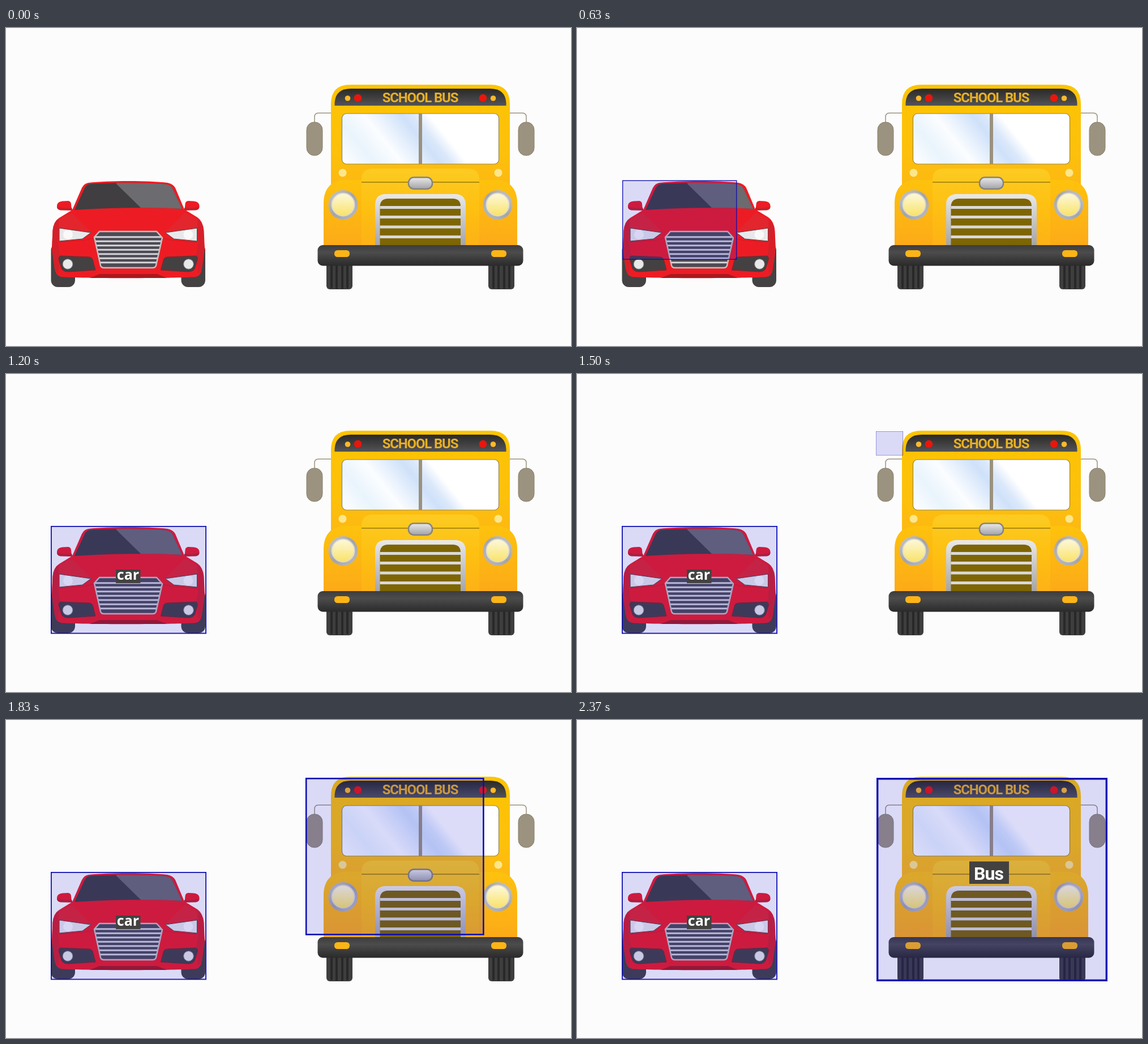
An HTML page that plays this animation: 998x561 px, repeating every 3.18 s.

```html
<!DOCTYPE html>
<html lang="en">
<head>
<meta charset="utf-8">
<title>Labelling a car and a bus</title>
<style>
html, body { margin: 0; width: 100%; height: 100%; overflow: hidden; background: #fcfcfc; }
svg { display: block; width: 100vw; height: 100vh; }
text { font-weight: 700; text-anchor: middle; }
.sign { font-family: Roboto, sans-serif; font-size: 24px; letter-spacing: -1.2px; fill: #e9b022; }
.label { fill: #fff; visibility: hidden; animation: 3180ms step-end infinite; }
.label rect { fill: #434241; }
#carLabel { font-family: "Open Sans", sans-serif; font-size: 25px; animation-name: showCar; }
#busLabel { font-family: Roboto, sans-serif; font-size: 32px; letter-spacing: -1px; animation-name: showBus; }
@keyframes showCar { 0% { visibility: hidden; } 37.736%, 100% { visibility: visible; } }
@keyframes showBus { 0% { visibility: hidden; } 74.528%, 100% { visibility: visible; } }
.box { fill: rgba(20, 20, 215, .15); stroke: #0f0fb2; }
</style>
</head>
<body>
<svg viewBox="0 0 998 561" preserveAspectRatio="none">
  <defs>
    <linearGradient id="cab" x2="0" y2="1">
      <stop stop-color="#fcc403"/><stop offset=".6" stop-color="#fdc00b"/><stop offset="1" stop-color="#fdb515"/>
    </linearGradient>
    <linearGradient id="fender" x2="0" y2="1">
      <stop stop-color="#fec20d"/><stop offset="1" stop-color="#fcaa18"/>
    </linearGradient>
    <linearGradient id="hood" x2="0" y2="1">
      <stop stop-color="#fccb22"/><stop offset=".5" stop-color="#fec011"/><stop offset="1" stop-color="#fdb116"/>
    </linearGradient>
    <linearGradient id="panel" x2="0" y2="1">
      <stop stop-color="#2a2929"/><stop offset="1" stop-color="#545355"/>
    </linearGradient>
    <linearGradient id="bumper" x2="0" y2="1">
      <stop stop-color="#3d3c3d"/><stop offset=".35" stop-color="#4d4c4d"/><stop offset="1" stop-color="#2b2a2a"/>
    </linearGradient>
    <linearGradient id="steel" x2="0" y2="1">
      <stop stop-color="#e9e9ea"/><stop offset="1" stop-color="#a3a3a6"/>
    </linearGradient>
    <linearGradient id="ring" x2="1" y2="1">
      <stop stop-color="#c9c9cb"/><stop offset=".5" stop-color="#a4a4a6"/><stop offset="1" stop-color="#bdbdbf"/>
    </linearGradient>
    <linearGradient id="lamp" x2="0" y2="1">
      <stop stop-color="#fdf9dc"/><stop offset="1" stop-color="#f9e268"/>
    </linearGradient>
    <linearGradient id="glass" gradientUnits="userSpaceOnUse" x1="593" y1="240" x2="805" y2="69">
      <stop stop-color="#fff"/><stop offset=".17" stop-color="#e9f4fc"/><stop offset=".31" stop-color="#fbfdff"/>
      <stop offset=".5" stop-color="#cfe1f9"/><stop offset=".56" stop-color="#dbe8fa"/><stop offset=".64" stop-color="#fff"/>
    </linearGradient>
    <clipPath id="grilleClip"><path d="M165 359H266L276 370 265 419Q264 423 259 423H173Q168 423 167 419L156 369Z"/></clipPath>
    <clipPath id="screenClip"><path d="M121 321 139 282Q142 276 149 275C185 272.500 250 272.500 283 276Q291 277 294 283L311 319C250 316 180 317 121 321Z"/></clipPath>

    <g id="carSide">
      <rect x="79.500" y="380" width="42.500" height="77" rx="12" fill="#444243"/>
      <path d="M116 321H96Q89 320 90 313 91 306 100 305.500L110 305Q115 306 115 311Z" fill="#ed1c24"/>
      <path d="M118 322 96 321.500Q90 320 90 315 103 319 116 317Z" fill="#c91f27"/>
    </g>
    <g id="carFront">
      <path d="M93 337Q84 343 82.500 357L81 390 86 425 92 434 96 404 92 377Z" fill="#d5202a"/>
      <path d="M93 352 151 361 116 326 94 338Z" fill="#e3252d"/>
      <path d="M94 353 150 361 135 372 94 376Z" fill="#e8e8ea" stroke="#5c3f42"/>
      <circle cx="109.500" cy="364.500" r="8.500" fill="#f9f9f9"/>
      <path d="M94 378 136 375 154 371" fill="none" stroke="#cf1b24"/>
      <path d="M96 402 147 404Q151 404 153 408L158 427 110 430Q101 430 98 424L93 407Q93 403 96 402Z" fill="#444143" stroke="#7b2529"/>
      <circle cx="109" cy="416.500" r="8.800" fill="#e9e9e9" stroke="#929091"/>
    </g>
    <g id="busSide">
      <path d="M575 150H552Q545 150 545 157V168" fill="none" stroke="#9b927f" stroke-width="1.500"/>
      <rect x="531" y="166" width="28" height="59" rx="13.500" fill="#9b927f" stroke="#8c8370"/>
      <rect x="566" y="412" width="46" height="49" rx="6" fill="#3f3e3f"/>
      <path d="M575 416V459M584 416V460M594 416V460M603 416V459" stroke="#292829" stroke-width="4"/>
    </g>
    <g id="busLights">
      <circle cx="603.500" cy="124" r="4.800" fill="#fdb92a"/>
      <circle cx="621.500" cy="123.500" r="6.800" fill="#e8160c"/>
      <circle cx="594.500" cy="255.500" r="7" fill="#fde68c"/>
      <circle cx="595.500" cy="312" r="26" fill="url(#ring)"/>
      <circle cx="595.500" cy="311.500" r="20" fill="url(#lamp)" stroke="#dcdbd4" stroke-width="2"/>
      <rect x="580" y="392" width="27" height="12" rx="5.500" fill="#fdb515"/>
    </g>
  </defs>

  <rect width="998" height="561" fill="#fcfcfc"/>

  <g id="car">
    <use href="#carSide"/>
    <use href="#carSide" transform="matrix(-1 0 0 1 431.500 0)"/>
    <path fill="#ed1c24" d="M117 321 134 282Q138 274 146 273C180 269 252 269 285 273Q295 275 299 282L315 320 338 334Q348 341 349.500 357L351 390 346 425Q344 438 335 439C300 442 130 442 97 439Q88 437 86 425L81 390 82.500 357Q84 341 94 335Z"/>
    <g clip-path="url(#screenClip)">
      <path d="M115 270H315V325H115Z" fill="#403e40"/>
      <path d="M195 270H315V325H245L239 318 195 275Z" fill="#6c6b6f"/>
    </g>
    <use href="#carFront"/>
    <use href="#carFront" transform="matrix(-1 0 0 1 431.500 0)"/>
    <path d="M165 434H267L284 441H148Z" fill="#a9191e"/>
    <g clip-path="url(#grilleClip)">
      <path d="M150 355H280V425H150Z" fill="#4d4a54"/>
      <path d="M150 368.800H280M150 376.300H280M150 383.800H280M150 391.300H280M150 398.800H280M150 406.300H280M150 413.800H280" stroke="#d6d5da" stroke-width="3"/>
    </g>
    <path d="M165 359H266L276 370 265 419Q264 423 259 423H173Q168 423 167 419L156 369Z" fill="none" stroke="#c7bfbe" stroke-width="2.500"/>
  </g>

  <g id="bus">
    <use href="#busSide"/>
    <use href="#busSide" transform="matrix(-1 0 0 1 1464 0)"/>
    <path d="M574 300V134Q574 100 608 100H856Q890 100 890 134V300Z" fill="url(#cab)"/>
    <path d="M561 385V309C561 284 574 268 600 268H864C890 268 903 284 903 309V385Z" fill="url(#fender)"/>
    <path d="M628 385V268Q628 248 648 248H816Q836 248 836 268V385Z" fill="url(#hood)"/>
    <path d="M628 272H836" stroke="#b28a0c" stroke-width="1.800"/>
    <path d="M580.500 137V132Q582 107 609 107H855Q882 107 883.500 132V137Z" fill="url(#panel)"/>
    <text class="sign" x="731.500" y="131">SCHOOL BUS</text>
    <rect x="593.500" y="151" width="277" height="89" rx="8" fill="url(#glass)" stroke="#94874f" stroke-width="1.200"/>
    <rect x="729" y="151" width="6" height="89" fill="#9a917e"/>
    <rect x="711" y="263.500" width="42" height="20.500" rx="9.500" fill="url(#steel)" stroke="#858381" stroke-width="2.500"/>
    <path d="M652 385V312Q652 293 671 293H793Q812 293 812 312V385Z" fill="url(#steel)"/>
    <path d="M660.500 385V315Q661 301 675 301H789Q803 301 803 315V385Z" fill="#7e6503"/>
    <path d="M660.500 316.500H803M660.500 333.500H803M660.500 351H803M660.500 368.500H803" stroke="#dad9d8" stroke-width="5"/>
    <rect x="550.500" y="383" width="363" height="36.500" rx="9" fill="url(#bumper)"/>
    <use href="#busLights"/>
    <use href="#busLights" transform="matrix(-1 0 0 1 1464 0)"/>
  </g>

  <g id="carBox"><rect class="box" x="-2.900" y="-1.400" width="273.200" height="188.600" stroke-width="1.800"/></g>
  <g id="busBox"><rect class="box" x="2.200" y="2.200" width="404.600" height="355.600" stroke-width="3.400"/></g>

  <g id="carLabel" class="label">
    <rect x="194" y="345" width="43.500" height="24"/>
    <text x="215.500" y="363">car</text>
  </g>
  <g id="busLabel" class="label">
    <rect x="693" y="249.500" width="70" height="39.500"/>
    <text x="727" y="281.500">Bus</text>
  </g>
</svg>
<script>
const LOOP = 3180, TICK = 30;
const boxes = [
  { id: "carBox", x: 82.8, y: 270.3, start: 30, time: 900, lag: 1.916, power: 2.42 },
  { id: "busBox", x: 528.5, y: 101.5, start: 1260, time: 690, lag: 2.976, power: 1.49 }
].map(b => ({ ...b, node: document.getElementById(b.id) }));

// S-curve whose midpoint is delayed by lag
function ease(p, lag, power) {
  if (p <= 0) return 0;
  if (p >= 1) return 1;
  return 1 / (1 + lag * ((1 - p) / p) ** power);
}

function draw(now) {
  const t = Math.floor((now % LOOP) / TICK + 0.01) * TICK;
  for (const b of boxes) {
    const s = ease((t - b.start) / b.time, b.lag, b.power);
    b.node.setAttribute("transform", `translate(${b.x} ${b.y}) scale(${s})`);
    b.node.style.display = s ? "" : "none";
  }
}

function loop(now) {
  draw(now);
  requestAnimationFrame(loop);
}
draw(0);
requestAnimationFrame(loop);
</script>
</body>
</html>
```
